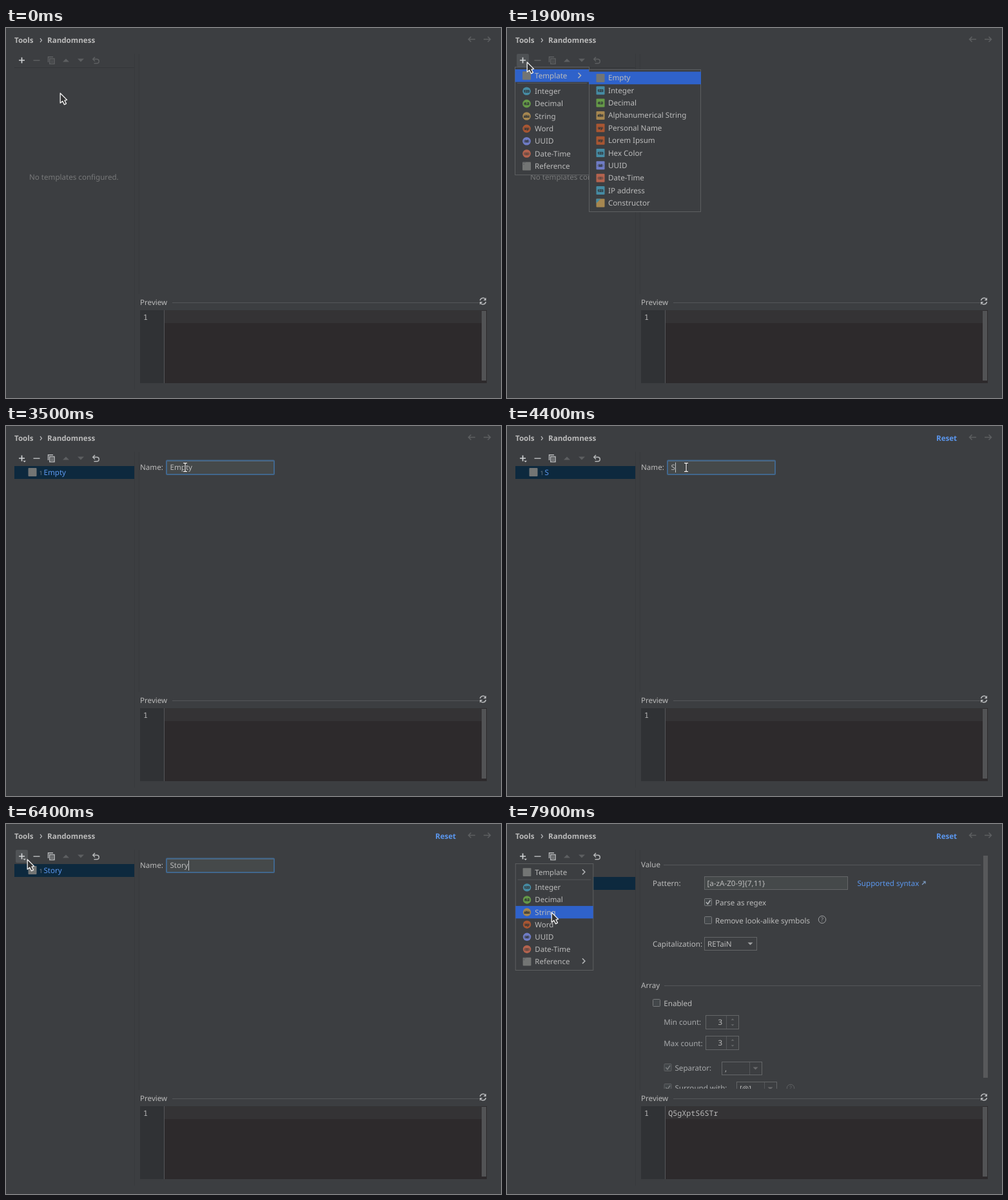
An HTML page that plays this animation: 768x573 px, repeating every 8 s.

```html
<!DOCTYPE html>
<html lang="en">
<head>
<meta charset="utf-8">
<title>Settings demo</title>
<style>
  html, body { margin: 0; width: 100%; height: 100%; overflow: hidden; background: #3c3e41; }
  svg { display: block; width: 768px; height: 573px; }
  text { font: 11.6px "Noto Sans", sans-serif; fill: #bbb; white-space: pre; text-rendering: geometricPrecision; }
  .bold { font-weight: bold; }
  .mono { font: 11.7px "Noto Sans Mono", monospace; }
  .dim { fill: #777879; }
  .soft { fill: #a7a9ab; }
  .link { fill: #5b97ee; }
  .tiny { font-size: 5.5px; font-weight: bold; fill: #2c3134; text-anchor: middle; }
  .mark { font-size: 9px; text-anchor: middle; }
  .line { stroke: #55575a; fill: none; }
  .icon { stroke: #b4b6b8; stroke-width: 1.5; fill: none; }
  .off .icon { stroke: #5d5f61; }
  .faint { stroke: #7c7e80; stroke-width: 1.5; fill: none; }
  .box { fill: #45494a; stroke: #646668; }
  .flat { fill: #3c3e41; stroke: #646668; }
  .hot { fill: #2f62ca; }
</style>
</head>
<body>
<svg id="stage" viewBox="0 0 768 573"></svg>
<script>
const LOOP = 8000, STEP = 100;
const stage = document.getElementById('stage');

// Drawing helpers; the y of a text is the middle of its line.
const text = (x, y, s, cls = '') => `<text x="${x}" y="${y + 4}" class="${cls}">${s}</text>`;
const rect = (x, y, w, h, attr) => `<rect x="${x}" y="${y}" width="${w}" height="${h}" ${attr}/>`;
const fill = c => `fill="${c}"`;
const path = (d, cls = 'icon', attr = '') => `<path d="${d}" class="${cls}" ${attr}/>`;
const during = (from, to, body) => `<g data-from="${from}" data-to="${to}">${body}</g>`;
const rule = (x, y) => path(`M${x} ${y + .5}H735`, 'line');
const triangle = (x, y, up, c = '#a0a2a4', r = 4) =>
  `<path d="M${x - r} ${y + (up ? r / 2 : -r / 2)}h${2 * r}l${-r} ${up ? -r : r}z" fill="${c}"/>`;

const TEAL = '#468ba3', GREEN = '#659a48', GOLD = '#a68750', RUST = '#a95632',
      BLUE = '#6f7cc6', RED = '#b4634e', GREY = '#737574';

function typeIcon(x, y, color, mark, round) {
  const shape = round
    ? `<circle cx="${x}" cy="${y}" r="6.3" fill="${color}"/>`
    : rect(x - 6.5, y - 6.5, 13, 13, `rx="1" ${fill(color)}`);
  if (!mark) return shape;
  return shape + rect(x - 4.5, y - 2, 9, 4.500, 'rx="2" fill="#3c3e41" opacity=".45"') +
    `<text x="${x}" y="${y + 2}" class="tiny">${mark}</text>`;
}

const chevron = (x, y) => path(`M${x - 2} ${y - 4}l4 4-4 4`);

const TYPES = [
  ['Template', GREY, ''], ['Integer', TEAL, '123'], ['Decimal', GREEN, '4.2'],
  ['String', GOLD, 'abc'], ['Word', RUST, 'xy'], ['UUID', BLUE, 'id'],
  ['Date-Time', RED, '::'], ['Reference', GREY, '']
];
const typeY = i => i ? 97.8 + (i - 1) * 19.35 : 73.8;

function typeMenu(width, hot, refArrow) {
  let out = rect(12.5, 60.5, width, 167, 'fill="#3c3e41" stroke="#5d5f61"');
  out += path(`M16 85.5H${9 + width}`, 'line');
  hot.forEach(([i, from]) => {
    out += during(from, LOOP, rect(12.5, typeY(i) - 9.8, width, 19.6, 'class="hot"'));
  });
  TYPES.forEach(([name, color, mark], i) => {
    const y = typeY(i);
    out += typeIcon(30.5, y, color, mark, i > 0 && i < 7) + text(43, y, name);
  });
  out += path('M25 208h4M25 211h2', 'line');
  out += chevron(width - 2.5, 73.5);
  return out + (refArrow ? chevron(width - 2.5, 213) : '');
}

const TEMPLATES = [
  ['Empty', GREY, ''], ['Integer', TEAL, '123'], ['Decimal', GREEN, '4.2'],
  ['Alphanumerical String', GOLD, 'abc'], ['Personal Name', RUST, 'xy'],
  ['Lorem Ipsum', RUST, 'xy'], ['Hex Color', TEAL, '123'], ['UUID', BLUE, 'id'],
  ['Date-Time', RED, '::'], ['IP address', TEAL, '123'], ['Constructor', GOLD, '']
];

function templateMenu() {
  let out = rect(127.5, 64.5, 173, 220, 'fill="#3c3e41" stroke="#5d5f61"');
  out += rect(127, 67.6, 174, 19.6, 'class="hot"');
  TEMPLATES.forEach(([name, color, mark], i) => {
    const y = 77.4 + i * 19.35;
    out += typeIcon(145, y, color, mark) + text(157, y, name);
  });
  return out + '<path d="M138.500 264.400h7l-7 7z" fill="#468ba3"/>';
}

const copyIcon = path('M67.800 47.500h7.200v8h-7.200zM65.500 53v-8.300h7.500') +
  path('M69.500 50h4M69.500 52.700h4', 'icon', 'style="stroke-width:1.200"');
const minusIcon = path('M42.500 50.200h10');
const undoIcon = path('M138 45l-3.200 3.300 3.200 3.300M135 48.300h6a3.200 3.200 0 0 1 0 6.500h-4.500');

function toolbar() {
  const edit = minusIcon + copyIcon + undoIcon;
  return during(900, 2300, rect(15, 40, 19, 20, 'rx="2" fill="#4e5154"')) +
    during(6200, 6700, rect(15, 40, 19, 20, 'rx="2" fill="#505356"')) +
    path('M24.500 45.500v9M20 50h9', 'icon', 'style="stroke:#d0d2d4;stroke-width:1.700"') +
    during(2800, LOOP, triangle(28.700, 55, false, '#c4c6c8', 2.300)) +
    triangle(93, 50, true, '#5d5f61', 5) + triangle(116, 50, false, '#5d5f61', 5) +
    during(0, 2800, `<g class="off">${edit}</g>`) + during(2800, LOOP, edit);
}

function header() {
  return text(13, 19, 'Tools', 'bold') + path('M53 16l2.500 3-2.500 3', 'icon', 'style="stroke-width:1.200"') +
    text(64, 19, 'Randomness', 'bold') +
    during(4300, LOOP, text(666, 19, 'Reset', 'bold link')) +
    '<g class="off">' + path('M728 17.500h-10M721.500 13.500l-4 4 4 4') +
    path('M741 17.500h10M747.500 13.500l4 4-4 4') + '</g>';
}

function preview() {
  return text(208, 425, 'Preview') + rule(258, 425) +
    path('M735.500 422a4.700 4.700 0 0 1 8.700-1.500M744.500 424a4.700 4.700 0 0 1-8.700 1.500') +
    '<path d="M745 417.500v4.500h-4.500zM735 428.500v-4.500h4.500z" fill="#b4b6b8"/>' +
    rect(208, 437, 538, 113, fill('#2d2a2c')) + rect(208, 437, 38, 113, fill('#303235')) +
    rect(246, 437, 492, 20, fill('#343335')) + path('M245.500 437V550', 'line') +
    rect(738, 438, 7, 108, fill('#525355')) +
    text(213, 448, '1', 'mono') + during(7500, LOOP, text(250.3, 448, 'Q5gXptS6STr', 'mono'));
}

function nameEditor() {
  return text(208, 64.3, 'Name:') +
    rect(249.5, 54.5, 166, 20, 'class="box"') +
    during(2800, 6600, rect(249, 53.500, 167, 21.500, 'rx="1" fill="none" stroke="#41678d" stroke-width="2"')) +
    during(3800, 4300, rect(254, 56, 35, 17, 'class="hot"')) +
    '<text id="field" x="254.500" y="68.300"></text>' +
    '<path id="caret" d="M0 56.500V72" stroke="#c4c6c8"/>';
}

function check(x, y, on, off) {
  const c = off ? '#5f6163' : '#787a7c';
  return rect(x + .5, y + .5, 11, 11, `rx="1" fill="#43474a" stroke="${c}"`) +
    (on ? path(`M${x + 3} ${y + 6}l2.500 3 4-6`, off ? 'faint' : 'icon') : '');
}

const help = (x, y, c) => `<circle cx="${x}" cy="${y}" r="5.700" fill="none" stroke="${c}"/>` +
  `<text x="${x}" y="${y + 3.2}" class="mark" style="fill:${c}">?</text>`;

function combo(x, y, w, label, split) {
  return rect(x + .5, y + .5, w, 20, 'class="flat"') + text(x + 5, y + 10.5, label) +
    (split ? path(`M${x + w - 18.500} ${y + 1}v19`, 'line') : '') +
    triangle(x + w - 9.5, y + 10.5, false, split ? '#68696b' : '#a0a2a4');
}

function spinner(y) {
  return rect(308.5, y + .5, 51, 21, 'class="flat"') + text(327.5, y + 11, '3') +
    path(`M340.500 ${y + 1}v20`, 'line') +
    triangle(350, y + 6.500, true, '#66686a', 2.500) + triangle(350, y + 15.5, false, '#66686a', 2.500);
}

function stringEditor() {
  const form = text(208, 62.5, 'Value') + rule(243, 63) +
    text(226, 91.5, 'Pattern:') + rect(306.5, 81.5, 222, 20, 'class="box"') +
    text(310.5, 91.5, '[a-zA-Z0-9]{7,11}') + text(543.5, 91.5, 'Supported syntax', 'link') +
    path('M644 94l4.500-4.500M645.500 89h3.500v3.500', 'icon', 'style="stroke:#7d9cc4;stroke-width:1.200"') +
    check(306, 115, true) + text(323, 122, 'Parse as regex') +
    check(306, 143) + text(323, 149.5, 'Remove look-alike symbols') + help(489, 148, '#9a9c9e') +
    text(226, 185.5, 'Capitalization:') + combo(306, 175, 81, 'RETaiN') +
    text(208, 250, 'Array') + rule(244, 250) +
    check(226, 271) + text(243.3, 278, 'Enabled') +
    text(243.3, 307, 'Min count:', 'soft') + spinner(296) +
    text(243.3, 339.5, 'Max count:', 'soft') + spinner(328) +
    check(243.5, 371, true, true) + text(260.5, 378, 'Separator:', 'soft') + combo(333, 368, 62, ',', true) +
    check(243.5, 402, true, true) + text(260.5, 409, 'Surround with:', 'soft') +
    combo(356, 399, 62, '[@]', true) + help(440, 409, '#5f6163');
  return `<g clip-path="url(#view)">${form}</g>` + rect(739, 49, 7, 344, fill('#58595b'));
}

function tree() {
  return during(0, 2800, text(36, 231.2, 'No templates configured.', 'dim')) +
    during(2800, 7500, rect(13, 62, 186, 20, fill('#0d293e'))) +
    during(7500, LOOP, rect(13, 82, 186, 20, fill('#0d293e'))) +
    during(2800, LOOP, typeIcon(41, 71.5, GREY, '') +
      '<text x="51.500" y="76" style="font-size:9px;fill:#6e7d8b">1</text>' +
      '<text id="node" x="58.500" y="76.300" class="link"></text>');
}

const OUTLINE = 'fill="#343435" stroke="#f4f4f4" stroke-width="1.300" stroke-linejoin="round"';
const POINTERS = {
  arrow: `<path d="M.200 0V15.200l3.600-2.900 2.700 5.300 3-1.500-2.500-4.900 3.600-.800z" ${OUTLINE}/>`,
  hand: `<path d="M-1.500 1.500q1.500-2 2.500 0l1.500 5 5.500 1q1.500.500 1.500 2.500l-1.500 6.500H0l-1.500-2.500-4.500-2.500q-1-2.500 1.500-2l3 1z" ${OUTLINE}/>`,
  beam: '<path d="M-3-6.500h6M0-6.500v13M-3 6.500h6" fill="none" stroke="#1d1d1e" stroke-width="3"/>' +
    '<path d="M-3-6.500h6M0-6.500v13M-3 6.500h6" fill="none" stroke="#f4f4f4" stroke-width="1.300"/>'
};

stage.innerHTML = '<clipPath id="view"><rect x="200" y="40" width="568" height="370"/></clipPath>' +
  rect(0, 0, 768, 573, fill('#3c3e41')) +
  path('M199.500 40V560M206.500 40V412', 'line', 'style="stroke:#37393c"') +
  during(0, 2800, path('M13 61.500H199', 'line', 'style="stroke:#333538"')) +
  header() + toolbar() + tree() + preview() +
  during(2800, 7500, nameEditor()) + during(7500, LOOP, stringEditor()) +
  during(1200, 2700, typeMenu(115, [[0, 1500]], false)) +
  during(1500, 2700, templateMenu()) +
  during(6600, LOOP, `<g id="closing">${typeMenu(122, [[3, 7000]], true)}</g>`) +
  '<g id="pointer">' +
  Object.entries(POINTERS).map(([k, d]) => `<g id="${k}">${d}</g>`).join('') + '</g>';

const el = Object.fromEntries([...stage.querySelectorAll('[id]')].map(e => [e.id, e]));
const timed = [...stage.querySelectorAll('[data-from]')].map(e =>
  ({ e, from: +e.dataset.from, to: +e.dataset.to }));
const show = (e, on) => e.setAttribute('visibility', on ? 'inherit' : 'hidden');

// Pointer stops: time, x, y.
const STOPS = [
  [0, 84, 101], [300, 84, 101], [900, 31, 53], [2000, 31, 53], [2400, 170, 79], [2700, 170, 79],
  [3200, 278, 64], [5600, 278, 64], [6200, 33, 55], [6600, 33, 55], [7000, 69, 137], [LOOP, 69, 137]
];

function pointerAt(t) {
  const i = STOPS.findIndex(s => s[0] > t);
  const [t0, x0, y0] = STOPS[i - 1], [t1, x1, y1] = STOPS[i];
  const p = (t - t0) / (t1 - t0), k = p * p * (3 - 2 * p);
  return [x0 + (x1 - x0) * k, y0 + (y1 - y0) * k];
}

function render(t) {
  timed.forEach(({ e, from, to }) => show(e, t >= from && t < to));

  const typed = Math.floor((t - 4300) / 200) + 1;
  const name = t < 4300 ? 'Empty' : 'Story'.slice(0, typed);
  if (el.field.textContent !== name) el.field.textContent = el.node.textContent = name;
  const x = Math.round(254.5 + el.field.getComputedTextLength()) + .5;
  el.caret.setAttribute('transform', `translate(${x})`);
  const blink = t < 5200 || (t - 5200) % 1000 < 500;
  show(el.caret, t >= 4300 && t < 6600 && blink);

  const scale = t < 7800 ? 1 : 1 - .012 * Math.min(1, (t - 7800) / 100);
  el.closing.setAttribute('transform', `translate(73.5 144) scale(${scale}) translate(-73.5 -144)`);

  const [px, py] = pointerAt(t);
  el.pointer.setAttribute('transform', `translate(${px} ${py})`);
  const inField = t >= 2800 && t < 6600 && px > 249 && px < 416;
  const kind = inField ? 'beam' : t >= 7000 && t < 7500 ? 'hand' : 'arrow';
  Object.keys(POINTERS).forEach(k => show(el[k], k === kind));
}

const start = performance.now();
function tick() {
  const t = Math.max(0, performance.now() - start) % LOOP;
  render(Math.floor(t / STEP) * STEP);
  requestAnimationFrame(tick);
}
tick();
</script>
</body>
</html>
```
